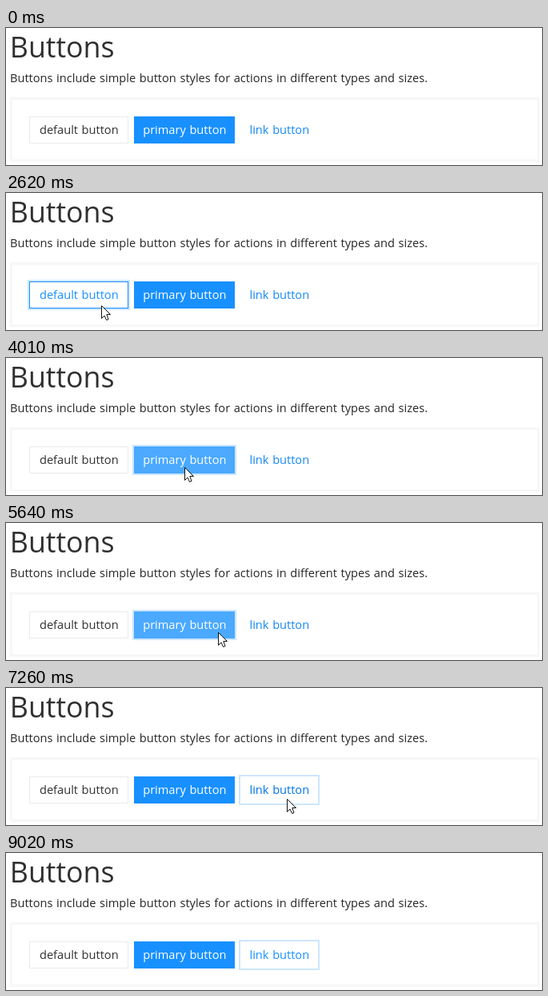
An HTML page for the animation above (9.65 s loop, 670 by 172 pixels).

```html
<!DOCTYPE html>
<html lang="en">
<head>
<meta charset="utf-8">
<title>Buttons</title>
<style>
  html, body { margin: 0; width: 100%; height: 100%; overflow: hidden; background: #fff; }
  svg { display: block; font: 14.6px "Open Sans", "Noto Sans", sans-serif; word-spacing: .85px; }
  .button text { text-anchor: middle; }
  .ring { fill: none; stroke: #cce6ff; stroke-width: 2; }
</style>
</head>
<body>
<svg width="670" height="172" viewBox="0 0 670 172">
  <text x="4.8" y="36.5" font-size="35.7" fill="#303030">Buttons</text>
  <text x="5" y="68" fill="#262626">Buttons include simple button styles for actions in different types and sizes.</text>
  <rect x="6.5" y="88.5" width="659" height="78" fill="none" stroke="#f7f7f7" stroke-width="3"/>
  <g id="buttons"></g>
  <path id="cursor" d="M.5.5V16.5L4 13 6.5 18.5 9 17.6 6.8 11.5H11.5Z" fill="#fff" stroke="#111"/>
</svg>
<script>
const LOOP = 9650, STEP = 76, TAP = 150;
const TOP = 111, HEIGHT = 34;
const BLUE = '#1890ff', LIGHT = '#4ba9ff', DARK = '#0076e4';

// Each look is [face, border, text].
const outline = color => ['#fff', color, color];
const solid = color => [color, color, '#fff'];
const plain = color => ['#fff', '#fff', color];

// Two presses alternate with releases on a steady beat from `start`; `tap` is a short extra press.
const buttons = [
  { label: 'default button', x: 29, width: 124, start: 760, beat: 460, tap: 2450,
    idle: ['#fff', '#ebebeb', '#303030'], hover: outline(BLUE), focus: outline(BLUE), press: outline(DARK) },
  { label: 'primary button', x: 160, width: 126, start: 3460, beat: 500,
    idle: solid(BLUE), hover: solid(LIGHT), focus: solid(BLUE), press: solid(DARK) },
  { label: 'link button', x: 293, width: 97, start: 6640, beat: 310, tap: 7800,
    idle: plain('#1588f2'), hover: plain(BLUE), focus: plain(BLUE), press: plain(DARK) },
];

// The pointer glides to each stop in a number of equal jumps.
const OFFSTAGE = { x: 140, y: 180 };
const stops = [
  { at: 210, jumps: 3, x: 119, y: 141 },
  { at: 2850, jumps: 3, x: 223, y: 137 },
  { at: 5640, jumps: 1, x: 265, y: 137 },
  { at: 5716, jumps: 3, x: 376, y: 147 },
  { at: 6100, jumps: 4, x: 351, y: 139 },
  { at: 7876, jumps: 4, x: 284, y: 155 },
  { at: 8180, jumps: 3, x: 195, y: 140 },
  { at: 8480, jumps: 2, x: 130, y: 140 },
  { at: 8632, jumps: 5, x: 409, y: 168 },
  { at: 9020, jumps: 1, ...OFFSTAGE },
];

function pointerAt(time) {
  const index = stops.findLastIndex(stop => stop.at <= time);
  if (index < 0) return OFFSTAGE;
  const stop = stops[index], from = stops[index - 1] || OFFSTAGE;
  const part = Math.min(1, (1 + Math.floor((time - stop.at) / STEP)) / stop.jumps);
  const mix = axis => Math.round(from[axis] + (stop[axis] - from[axis]) * part);
  return { x: mix('x'), y: mix('y') };
}

function isPressed({ start, beat, tap }, time) {
  const count = Math.floor((time - start) / beat);
  return count === 0 || count === 2 || (time >= tap && time < tap + TAP);
}

function add(parent, name, attributes = {}) {
  const node = document.createElementNS('http://www.w3.org/2000/svg', name);
  for (const key in attributes) node.setAttribute(key, attributes[key]);
  return parent.appendChild(node);
}

for (const button of buttons) {
  const { x, width, label } = button;
  const group = add(document.getElementById('buttons'), 'g', { class: 'button' });
  button.ring = add(group, 'rect', { class: 'ring', x: x - 1, y: TOP - 1, width: width + 2, height: HEIGHT + 2 });
  button.face = add(group, 'rect', { x: x + .5, y: TOP + .5, width: width - 1, height: HEIGHT - 1 });
  button.text = add(group, 'text', { x: x + width / 2 + .3, y: 133 });
  button.text.textContent = label;
}

const cursor = document.getElementById('cursor');

function draw(time) {
  const { x, y } = pointerAt(time);
  const focused = buttons.findLast(button => button.start <= time);
  cursor.setAttribute('transform', `translate(${x} ${y})`);

  for (const button of buttons) {
    const hovered = x >= button.x && x < button.x + button.width && y >= TOP && y < TOP + HEIGHT;
    const hasFocus = button === focused;
    const state = isPressed(button, time) ? 'press' : hovered ? 'hover' : hasFocus ? 'focus' : 'idle';
    const [face, border, text] = button[state];
    button.face.setAttribute('fill', face);
    button.face.setAttribute('stroke', border);
    button.text.setAttribute('fill', text);
    button.ring.setAttribute('visibility', hasFocus ? 'visible' : 'hidden');
  }
}

const begin = performance.now();
function tick() {
  draw((performance.now() - begin) % LOOP);
  requestAnimationFrame(tick);
}
tick();
</script>
</body>
</html>
```
